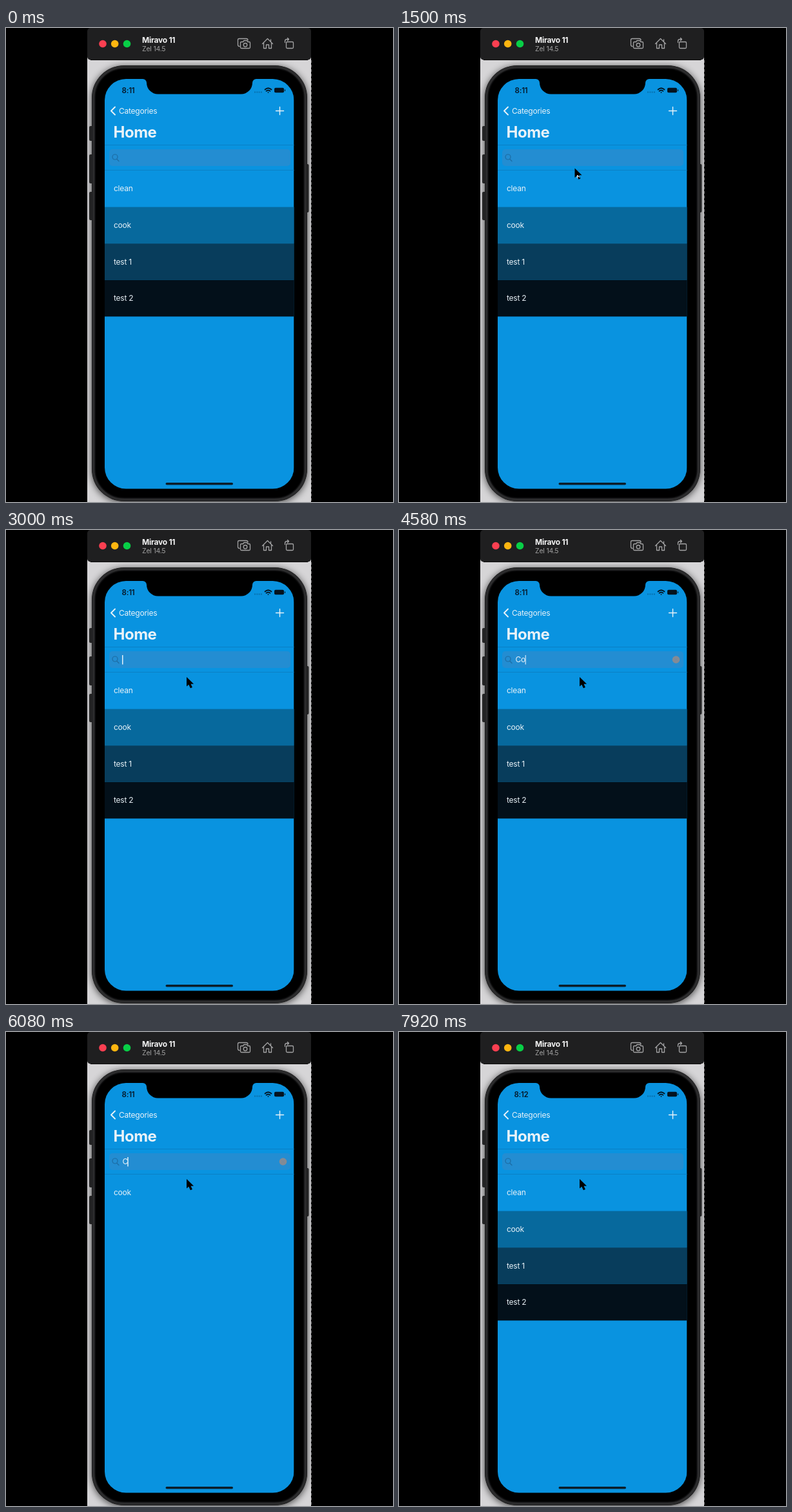
An HTML page for the animation above (8000 ms loop, 600 by 735 pixels).

```html
<!DOCTYPE html>
<html lang="en">
<head>
<meta charset="utf-8">
<title>To-do search</title>
<style>
  html, body { margin: 0; width: 100%; height: 100%; overflow: hidden; background: #000; }
  svg { display: block; width: 600px; height: 735px; }
  text { font-family: Inter, "Open Sans", sans-serif; font-size: 12px; letter-spacing: -.02em; fill: #e9f2f8; white-space: pre; }
  .line { fill: none; stroke-linecap: round; stroke-linejoin: round; }
</style>
</head>
<body>
<svg viewBox="0 0 600 735">
  <defs>
    <filter id="soft" x="-10%" y="-10%" width="120%" height="120%"><feGaussianBlur stdDeviation="6"/></filter>
    <clipPath id="window"><rect x="126" width="347" height="735"/></clipPath>
    <clipPath id="screen"><rect x="153" y="79" width="293.5" height="635.5" rx="33"/></clipPath>
  </defs>
  <rect width="600" height="735"/>

  <g clip-path="url(#window)">
    <rect x="126" y="40" width="347" height="695" fill="#d6d5d7"/>
    <rect x="133" y="60" width="334" height="676" rx="50" filter="url(#soft)" opacity=".7"/>
    <rect x="126" width="347" height="49.500" rx="5" fill="#1f1f20"/>
    <path d="M131 49.500H468" stroke="#0c0c0c"/>
    <g fill="#252526">
      <rect x="129" y="152" width="7" height="23" rx="2"/>
      <rect x="129" y="196" width="7" height="45" rx="2"/>
      <rect x="129" y="254" width="7" height="44" rx="2"/>
      <rect x="463" y="211" width="6.500" height="75" rx="2"/>
    </g>
    <rect x="133" y="58" width="334" height="676" rx="50" fill="#0d0d0e"/>
    <rect x="135.500" y="60.500" width="329" height="671" rx="47.500" fill="none" stroke="#2b2b2c" stroke-width="4"/>
    <rect x="139" y="64" width="322" height="664" rx="44" fill="#000"/>
  </g>
  <path d="M473.500 50V735" stroke="#bbb" stroke-dasharray="4 3" opacity=".5"/>

  <circle cx="150" cy="24.500" r="5.800" fill="#fb3f51"/>
  <circle cx="168.700" cy="24.500" r="5.800" fill="#fdb510"/>
  <circle cx="187.500" cy="24.500" r="5.800" fill="#08ce46"/>
  <text x="211" y="22.500" style="font-weight:700;fill:#f4f4f4">Miravo 11</text>
  <text x="211" y="36" style="font-size:10.500px;fill:#a0a0a0">Zel 14.5</text>

  <g class="line" stroke="#a3a3a4" stroke-width="1.300">
    <path d="M362 28.500Q359.500 28.500 359.500 26V18.500Q359.500 16.500 361.500 16.500H372.500Q375 16.500 375 19"/>
    <path d="M365 21.500H367.500L369 19.500H373.500L375 21.500H377Q378.500 21.500 378.500 23V30Q378.500 31.500 377 31.500H365Q363.500 31.500 363.500 30V23Q363.500 21.500 365 21.500Z"/>
    <circle cx="371" cy="26.300" r="2.800"/>
    <path d="M397.500 24.500L405.500 16.500 413.500 24.500M399.500 23V31.500H403.500V26H407.500V31.500H411.500V23M410.500 18V21"/>
    <rect x="434.500" y="21.500" width="11" height="10" rx="1.500"/>
    <path d="M432.500 22.500V20.500Q432.500 17.500 435.500 17.500H438M436.500 15.500L438.500 17.500 436.500 19.500"/>
  </g>

  <g clip-path="url(#screen)">
    <rect x="153" y="79" width="293.500" height="636" fill="#0993e0"/>
    <path d="M153 181.500H447M153 220.500H447" stroke="#0a80c5"/>
    <rect x="160" y="188" width="281" height="26" rx="5" fill="#238dd2"/>
    <g id="rows"></g>
    <rect x="247.500" y="705" width="104.500" height="3.500" rx="1.750" fill="#0c1d29"/>
  </g>
  <path d="M212 78H388V79A6 6 0 0 0 382 85A17.500 17.500 0 0 1 364.500 102.500H235.500A17.500 17.500 0 0 1 218 85A6 6 0 0 0 212 79Z"/>

  <text id="clock" x="189.500" y="101" text-anchor="middle" style="font-size:11.500px;font-weight:600;fill:#06192a"></text>
  <path d="M385 99.500H397" stroke="#0871ae" stroke-width="2" stroke-dasharray="2 1.300"/>
  <g class="line" stroke="#04131f" stroke-width="1.700">
    <path d="M401.500 95.500Q406.500 91 411.500 95.500M403.500 97.800Q406.500 95.300 409.500 97.800"/>
    <path d="M406.500 99.800V100"/>
  </g>
  <rect x="416" y="92.800" width="15" height="7.500" rx="2" fill="#04131f"/>
  <path d="M432.500 95.300V98" stroke="#04131f"/>

  <path class="line" d="M169 122.500L163 128.500 169 134.500" stroke="#e9f2f8" stroke-width="1.900"/>
  <text x="175" y="133">Categories</text>
  <path class="line" d="M418.500 128.500H430.500M424.500 122.500V134.500" stroke="#e9f2f8" stroke-width="1.400"/>
  <text x="166.500" y="169.500" style="font-size:24px;font-weight:700">Home</text>

  <path class="line" d="M172 203.500L175 206.500M173 200A4 4 0 1 1 165 200A4 4 0 1 1 173 200Z" stroke="#1d6ca3" stroke-width="1.200"/>
  <text id="query" x="180.500" y="205.300"></text>
  <rect id="caret" y="194" width="1.500" height="14.500" fill="#e4f0fa"/>
  <g id="clear">
    <circle cx="429.500" cy="201" r="5.800" fill="#858b95"/>
    <path class="line" d="M427.500 199L431.500 203M431.500 199L427.500 203" stroke="#7b8a9b"/>
  </g>
  <g id="cursor">
    <path d="M0 0V14.500L3.300 11.800 5.900 17.300 8.900 16 6.500 10.800H11Z"/>
    <path id="glint" class="line" d="M4 11.200V15M4 11.200L7 13.500" stroke="#e8eef4" stroke-width="1.200"/>
  </g>
</svg>
<script>
const LOOP = 8000;
const $ = id => document.getElementById(id);

const tasks = ['clean', 'cook', 'test 1', 'test 2'];
const shades = ['#0993e0', '#07699d', '#083d5c', '#03101a'];

// Each track lists [start ms, value]; a value holds until the next start.
const tracks = {
  clock: [[0, '8:11'], [7920, '8:12']],
  query: [[0, ''], [3500, 'C'], [4500, 'Co'], [5920, 'C'], [6420, '']],
  filter: [[0, ''], [4670, 'co'], [6420, '']],
  caret: [[0, 0], [2500, .6], [2580, 1], [4000, 0], [4500, .75], [4670, 0],
          [4920, .6], [5000, 1], [5500, .6], [5580, .3], [5670, 0], [5920, .6], [6080, 1], [6420, 0]],
  cursor: [[0, null], [1080, [350, 94]], [1170, [306, 166]], [1250, [276, 225]],
           [1420, [275, 222]], [1500, [272.5, 217.5]], [1580, [271.5, 213]],
           [1670, [271, 211]], [2080, [276, 220]], [2170, [280, 228]]],
  glint: [[0, false], [1500, true], [1580, false]]
};

const valueAt = (track, t) => track.findLast(([start]) => start <= t)[1];
const show = (id, visible) => $(id).setAttribute('visibility', visible ? 'visible' : 'hidden');
const caretX = { '': 180, C: 188.2, Co: 195.5 };
let shownFilter = null;

function drawRows(filter) {
  if (filter === shownFilter) return;
  shownFilter = filter;
  $('rows').innerHTML = tasks.filter(name => name.includes(filter)).map((name, i) => {
    const y = 221 + i * 56.6;
    const fill = i ? `<rect x="153" y="${y}" width="294" height="56.6" fill="${shades[i]}"/>` : '';
    return `${fill}<text x="167" y="${y + 32.3}">${name}</text>`;
  }).join('');
}

function render(t) {
  const now = {};
  for (const key in tracks) now[key] = valueAt(tracks[key], t);

  drawRows(now.filter);
  $('clock').textContent = now.clock;
  $('query').textContent = now.query;
  $('caret').setAttribute('x', caretX[now.query]);
  $('caret').setAttribute('opacity', now.caret);
  show('clear', now.query);
  show('cursor', now.cursor);
  show('glint', now.glint);
  if (now.cursor) $('cursor').setAttribute('transform', `translate(${now.cursor})`);
}

const begin = performance.now();
function tick() {
  render((performance.now() - begin) % LOOP);
  requestAnimationFrame(tick);
}
tick();
</script>
</body>
</html>
```
